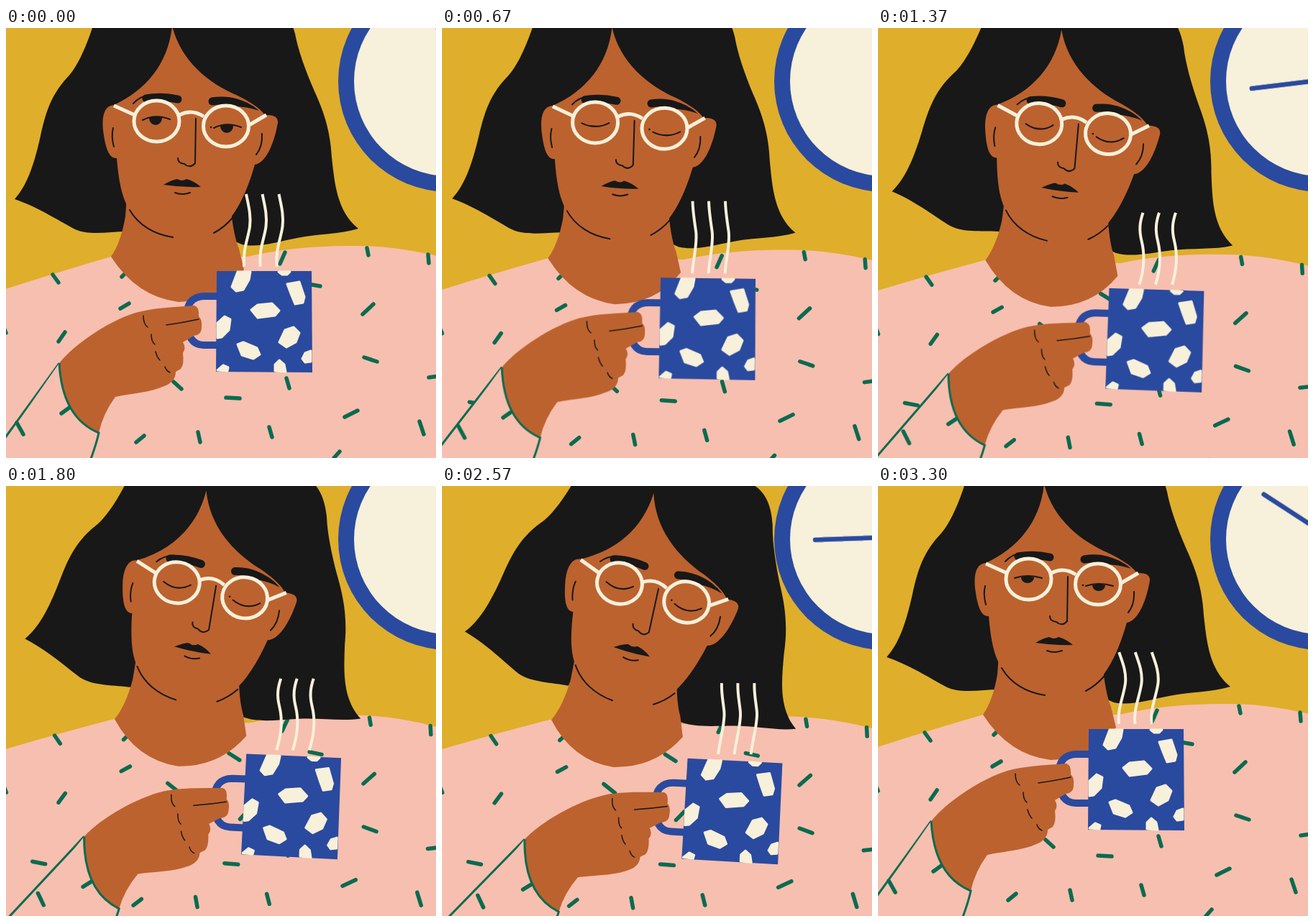
These frames come from a looping animation (598 by 598 pixels, 3330 ms). An HTML page without scripts:

```html
<!DOCTYPE html>
<html lang="en">
<head>
<meta charset="utf-8">
<title>Coffee break</title>
<style>
  @property --body { syntax: "<number>"; inherits: true; initial-value: 0; }
  @property --head { syntax: "<number>"; inherits: true; initial-value: 0; }
  @property --mug  { syntax: "<number>"; inherits: true; initial-value: 0; }
  @property --lid  { syntax: "<number>"; inherits: true; initial-value: 0; }

  html, body { margin: 0; width: 100%; height: 100%; overflow: hidden; background: #dfae2b; }
  svg {
    --loop: 3330ms linear infinite;
    display: block; width: 100vw; height: 100vh;
    animation: sway var(--loop), blink var(--loop);
  }

  .skin { fill: #bc622f; }
  .pink { fill: #f7bfaf; }
  .ink { fill: #181818; }
  .blue { fill: #2a4a9f; }
  .cream { fill: #f7f0da; }
  .line { fill: none; stroke: #181818; stroke-width: 2; stroke-linecap: round; stroke-linejoin: round; }
  .brow { stroke-width: 11; }
  .fine { stroke-width: 1.5; }
  .sprinkles { fill: none; stroke: #0b6b4f; stroke-width: 5.5; stroke-linecap: round; }
  .seam { fill: none; stroke: #0b6b4f; stroke-width: 3; }
  .glasses, .steam { fill: none; stroke: #f7f0da; stroke-width: 5; }
  .steam { stroke-width: 4; }
  .hand-of-clock { stroke: #2a4a9f; stroke-width: 6.5; stroke-linecap: round; transform-origin: 628px 71px; }
  .blots { stroke: #f7f0da; stroke-width: 3; stroke-linejoin: round; }

  .body {
    transform-origin: -80px 440px;
    transform: rotate(calc(var(--body) * 1.8deg));
  }
  .neck {
    transform-origin: 240px 345px;
    transform: skewX(calc(var(--head) * -5deg));
  }
  .head {
    transform-origin: 231px 296px;
    transform: translate(calc(var(--body) * 4px), calc(var(--body) * 7px)) rotate(calc(var(--head) * 11.4deg));
  }
  .arm {
    transform-origin: 270px 393px;
    transform: translate(calc(var(--mug) * 46.5px), calc(var(--mug) * 41px)) rotate(calc(var(--mug) * 4.5deg));
  }
  .sleeve {
    transform-origin: 74px 466px;
    transform: rotate(calc(var(--mug) * 4deg));
  }
  .mug {
    transform-origin: 293px 338px;
    transform: translate(calc(var(--mug) * 49px), calc(var(--mug) * 41px)) rotate(calc(var(--mug) * 3deg));
  }
  .steam {
    transform: translate(calc(293px + var(--mug) * 49px), calc(338px + var(--mug) * 41px));
  }
  .wave { animation: waft var(--loop); }
  .lid { animation: lid var(--loop); }
  .pupil {
    transform-origin: 208px 135px;
    transform: scaleY(calc(1 - var(--lid)));
  }
  .minute { animation: minute var(--loop); }
  .hour { animation: hour var(--loop); }

  @keyframes sway {
    0%    { --body: 0;    --head: 0;    --mug: 0; }
    11.1% { --body: .16;  --head: .02;  --mug: .1; }
    29.1% { --body: .47;  --head: .12;  --mug: .35; }
    41.1% { --body: .68;  --head: .36;  --mug: .58; }
    54%   { --body: .88;  --head: .74;  --mug: .84; }
    67%   { --body: 1;    --head: 1;    --mug: 1; animation-timing-function: ease-out; }
    73.6% { --body: 1.02; --head: 1.03; --mug: 1.02; animation-timing-function: ease-in; }
    86.2% { --body: .79;  --head: .82;  --mug: .78; animation-timing-function: ease-out; }
    96.7%, 100% { --body: 0; --head: 0; --mug: 0; }
  }
  @keyframes blink {
    0% { --lid: 0; }
    11.1% { --lid: .35; }
    22%, 88% { --lid: 1; }
    96.7%, 100% { --lid: .2; }
  }
  @keyframes lid {
    0% { d: path("M190 128Q208 119 228 127"); }
    11.1% { d: path("M190 129Q208 125 228 129"); }
    22%, 88% { d: path("M191 131Q211 143 229 130"); }
    96.7%, 100% { d: path("M190 128Q208 122 228 128"); }
  }
  @keyframes waft {
    0% { d: path("M41 -107C44 -92 48 -78 46 -62S36 -30 38 -6"); }
    11.1% { d: path("M42 -107C46 -95 52 -82 52 -66S40 -28 43 -7"); }
    29.1% { d: path("M47 -106C43 -94 41 -82 46 -64S51 -30 45 -5"); }
    41.1% { d: path("M47 -105C43 -93 41 -82 45 -66S50 -30 42 -5"); }
    67% { d: path("M49 -104C45 -92 43 -82 47 -66S50 -30 42 -5"); }
    86.2% { d: path("M46 -105C48 -93 54 -82 54 -66S41 -28 43 -6"); }
    100% { d: path("M42 -107C46 -95 52 -82 51 -66S39 -28 42 -7"); }
  }
  @keyframes minute { from { transform: rotate(-21deg); } to { transform: rotate(669deg); } }
  @keyframes hour { from { transform: rotate(-10deg); } to { transform: rotate(350deg); } }
</style>
</head>
<body>
<svg viewBox="0 0 598 598">
  <rect width="598" height="598" fill="#dfae2b"/>

  <g class="clock">
    <circle class="blue" cx="616" cy="74" r="154"/>
    <circle class="cream" cx="616" cy="74" r="132"/>
    <line class="hand-of-clock hour" x1="628" y1="71" x2="628" y2="-38"/>
    <line class="hand-of-clock minute" x1="628" y1="71" x2="628" y2="-38"/>
  </g>

  <g class="body">
    <path class="pink" d="M-40 376Q50 346 146 318L335 318Q400 303 480 303Q555 302 640 328V700H-40Z"/>
    <path class="sprinkles" d="M65 343L73 354M159 390L171 383M73 436L82 423M502 306L504 316M587 315L588 327
      M496 398L511 384M498 458L516 464M471 541L489 532M306 514L325 515M181 576L192 567M267 562L270 576
      M366 555L370 569M575 547L581 565M588 486L602 484M456 598L464 589M390 487L394 501M420 356L437 359
      M381 328L388 312M233 492L244 502M308 361L323 370M224 405L240 417M326 452L337 440M161 346L165 342
      M-3 417L0 424M39 519L57 522"/>
  </g>

  <g class="head">
    <path class="ink" d="M120 0C110 30 98 56 85 69C60 96 54 124 48 150C38 195 28 220 12 238C45 249 80 272 96 280
      C116 289 145 283 168 283L180 235L328 301C350 306 375 298 405 292C435 286 465 287 490 279
      C460 255 457 215 453 180C451 140 440 112 429 88C416 58 406 30 402 8C394 -22 380 -42 350 -45H150Z"/>
  </g>

  <g class="body">
    <path class="skin neck" d="M168 235L166 262Q160 298 146 318Q182 374 240 381Q298 380 331 336L324 307Q316 288 312 245Z"/>
  </g>

  <g class="head">
    <path class="skin" d="M231 -3C226 48 196 86 150 107C137 108 133 122 135 142C138 166 143 182 154 181
      C157 216 162 238 172 253C184 274 206 287 232 292Q275 294 300 277C322 258 336 225 346 190
      C360 188 372 165 378 132C379 122 370 121 360 121C352 110 338 102 322 94C280 76 243 45 231 -3Z"/>
    <path class="line" d="M172 253C184 274 206 287 232 291M289 285Q304 277 315 264M149 139Q146 151 150 165M356 147Q357 165 348 176"/>
    <path class="line brow" d="M195 98Q216 94 239 99M287 102Q305 99 320 104"/>
    <path class="line" stroke-width="3" d="M177 105Q186 95 200 93"/>
    <path class="ink" d="M315 97Q338 102 352 115Q335 109 315 109Z"/>
    <g>
      <path class="line lid" d="M190 128Q208 119 228 127"/>
      <path class="ink pupil" d="M199 125Q208 121 217 125A8.5 9.5 0 0 1 199 125Z"/>
    </g>
    <g transform="translate(99 11)">
      <path class="line lid" d="M190 128Q208 119 228 127"/>
      <path class="ink pupil" d="M199 125Q208 121 217 125A8.5 9.5 0 0 1 199 125Z"/>
    </g>
    <circle class="ink" cx="285" cy="138" r="1.3"/>
    <g class="glasses">
      <ellipse cx="209.5" cy="129.5" rx="31.5" ry="28.5"/>
      <ellipse cx="306" cy="136.5" rx="31.5" ry="28.5"/>
      <path d="M241 121Q258 112 275 123M150 108L179 121M338 135L362 121"/>
    </g>
    <path class="line" d="M264 126L263 188Q256 196 248 189Q239 188 239 181"/>
    <path class="ink" d="M219 218Q231 211 238 210Q245 214 251 210Q262 213 271 221Q245 222 219 218Z"/>
    <path class="line" d="M235 229Q245 233 256 229"/>
  </g>

  <g class="steam">
    <path class="wave" d="M41 -107C44 -92 48 -78 46 -62S36 -30 38 -6"/>
    <g transform="translate(22.5)"><path class="wave" d="M41 -107C44 -92 48 -78 46 -62S36 -30 38 -6"/></g>
    <g transform="translate(45.5)"><path class="wave" d="M41 -107C44 -92 48 -78 46 -62S36 -30 38 -6"/></g>
  </g>

  <g class="mug">
    <path d="M296 373H275Q251 374 251 402Q251 441 275 441H296" fill="none" stroke="#2a4a9f" stroke-width="10"/>
    <path class="blue" d="M293 338H425L426 479L292 478Z"/>
    <path class="cream blots" d="M322 339L340 339L338 350L330 364L320 366L314 360Z M379 339H395L391 343H384Z
      M391 356L408 353L415 374L413 382L402 384L397 372Z M341 392L350 385L370 383L380 393L374 400L350 403Z
      M294 410L304 401L312 405L310 420L300 430L294 431Z M380 437L388 420L400 416L408 424L403 437L390 444Z
      M322 440L330 437L349 445L353 454L344 460L328 455Z M374 477L374 468L380 462L387 468L389 478Z
      M412 460L416 452L424 449L424 464L416 465Z M294 476L302 469L309 472L308 477Z"/>
  </g>

  <g class="arm">
    <g class="sleeve">
      <path class="pink" d="M74 466L-60 651H60Z"/>
      <path class="seam" d="M74 466L-60 651"/>
    </g>
    <path class="pink" d="M74 466L-55 651H104L129 563Z"/>
    <path class="sprinkles" d="M15 549L24 565M77 536L88 528"/>
    <path class="skin" d="M74 466C96 439 142 408 180 396C205 389 235 388 262 386Q269 388 268 401Q273 405 272 416
      Q272 427 261 428L246 437Q251 445 246 452Q248 468 243 474L236 478Q236 492 220 498C200 507 175 508 152 513
      Q135 536 129 563Q78 542 74 466Z"/>
    <path class="line fine" d="M223 413Q245 410 268 405M191 400Q191 412 197 416M202 426Q202 436 207 440M208 450Q210 458 214 462M221 471Q223 477 228 479"/>
    <path class="seam" d="M74 466Q78 542 129 563Q125 582 112 615"/>
  </g>
</svg>
</body>
</html>
```
